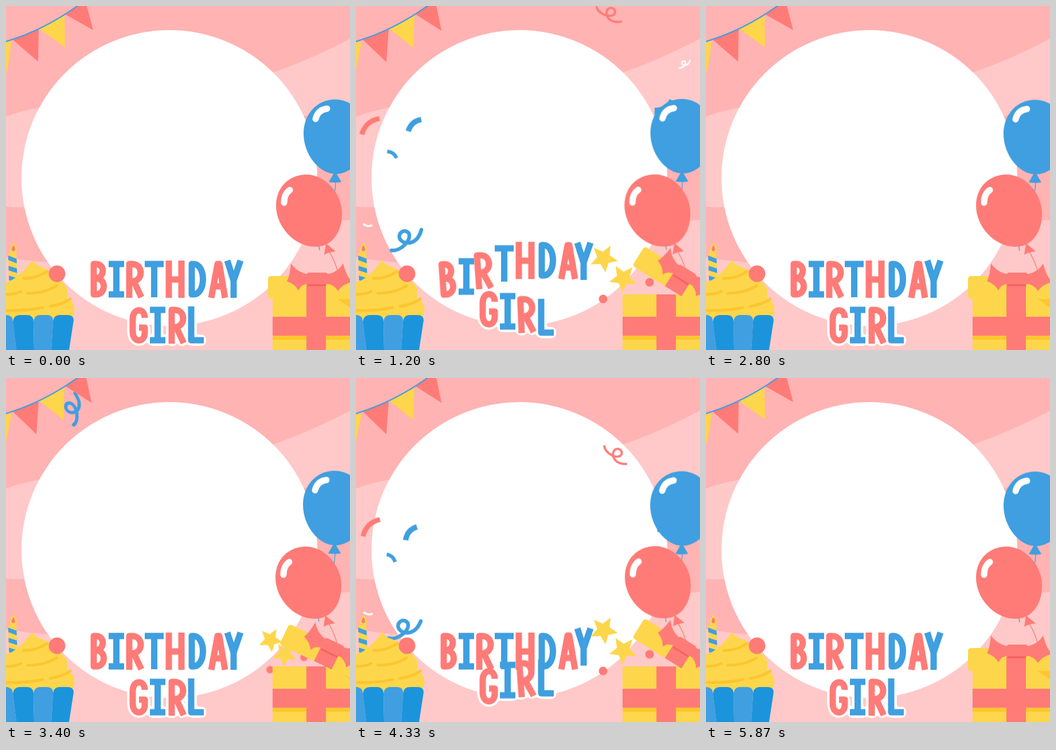
Animation, 600 px wide and 600 px high, one loop 5.94 s. Source, as an HTML page:

```html
<!DOCTYPE html>
<html lang="en">
<head>
<meta charset="utf-8">
<title>Birthday girl</title>
<style>
html, body { margin: 0; width: 100%; height: 100%; overflow: hidden; background: #fec9c8; }
svg { display: block; width: 100%; height: 100%; }
:root { --red: #ff7b77; --blue: #3f9fe0; --deep: #1c94dc; --yellow: #fdd64b; --amber: #fcc62f; --loop: 2970ms; }
.red { fill: var(--red); } .blue { fill: var(--blue); } .deep { fill: var(--deep); }
.yellow { fill: var(--yellow); } .amber { fill: var(--amber); } .white { fill: #fff; }
.line { fill: none; }

/* bunting */
.flag { transform-box: fill-box; transform-origin: 50% 0; animation: swing var(--loop) ease-in-out infinite; }
@keyframes swing { 0%, 2% { rotate: 0deg; } 14%, 68% { rotate: 3deg; } 84%, 100% { rotate: 0deg; } }

/* balloons */
.blue-x { animation: blue-x 1485ms ease-in-out infinite alternate; }
.blue-y { animation: blue-y 1485ms ease-in-out -742ms infinite alternate; }
.red-x { animation: red-x var(--loop) ease-in-out infinite; }
.red-y { animation: red-y var(--loop) ease-in-out infinite; }
@keyframes blue-x { to { transform: translateX(-6px); } }
@keyframes blue-y { from { transform: translateY(1.5px); } to { transform: translateY(-1.5px); } }
@keyframes red-x { 35% { transform: translateX(-3px); } 65%, 100% { transform: none; } }
@keyframes red-y { 0%, 30% { transform: none; } 66% { transform: translateY(-2px); } 100% { transform: none; } }

/* gift */
.lid { transform-origin: 457px 511px; animation: lid var(--loop) linear infinite; }
@keyframes lid {
  0%, 6% { transform: none; animation-timing-function: ease-out; }
  20%, 60.6% { transform: translate(25px, -58px) rotate(32deg); }
  82.5%, 100% { transform: none; }
}
.pop { animation: pop var(--loop) infinite; }
@keyframes pop {
  0%, 8% { transform: translate(540px, 502px) scale(.5); animation-timing-function: ease-out; }
  20%, 62.3% { transform: translate(var(--x), var(--y)); animation-timing-function: ease-in; }
  81%, 100% { transform: translate(540px, 502px) scale(.5); }
}

/* lettering */
.glyph { fill: none; stroke-width: 11; stroke-linejoin: round; }
.hop { transform-box: fill-box; transform-origin: 50% 100%; animation: hop var(--loop) infinite; }
@keyframes hop {
  0%, 27.6% { transform: none; animation-timing-function: cubic-bezier(.25, .2, .6, 1); }
  35.3%, 36.4% { transform: translateY(-33px) rotate(var(--tilt)); animation-timing-function: ease-in-out; }
  40.6% { transform: rotate(var(--tilt)); }
  44%, 100% { transform: none; }
}

/* confetti */
.bit { animation: fall var(--loop) linear infinite; }
@keyframes fall {
  0%, 10% { transform: var(--a); opacity: 0; }
  10.1% { transform: var(--a); opacity: 1; }
  30.3% { transform: var(--b); }
  40.4% { transform: var(--c); }
  74% { transform: var(--d); opacity: 1; }
  74.1%, 100% { transform: var(--d); opacity: 0; }
}
</style>
</head>
<body>
<svg viewBox="0 0 600 600" role="img" aria-label="Birthday girl">
  <!-- Even white rim around the letters: a blur, cut off hard -->
  <filter id="rim" filterUnits="userSpaceOnUse" x="120" y="380" width="320" height="220" color-interpolation-filters="sRGB">
    <feGaussianBlur in="SourceAlpha" stdDeviation="3"/>
    <feComponentTransfer result="fat"><feFuncA type="linear" slope="20" intercept="-1.4"/></feComponentTransfer>
    <feFlood flood-color="#fff"/>
    <feComposite in2="fat" operator="in" result="white"/>
    <feMerge><feMergeNode in="white"/><feMergeNode in="SourceGraphic"/></feMerge>
  </filter>

  <rect width="600" height="600" fill="#fec9c8"/>
  <path fill="#ffb3b3" d="M0 0H600V57Q530 94 465 116C330 170 170 150 45 180Q20 185 0 193Z"/>
  <path fill="#ffb3b3" d="M0 350C150 365 360 205 600 178V373C400 390 240 480 0 438Z"/>
  <circle class="white" cx="285" cy="300" r="258"/>

  <g id="confetti"></g>

  <path class="flag yellow" d="M-22 70L10 61L2 115Z"/>
  <path class="flag red" d="M12 59L57 40L56 97Z"/>
  <path class="flag yellow" d="M58 40L102 16L103 72Z"/>
  <path class="flag red" d="M104 15L138 -11L152 42Z"/>
  <path class="line" d="M-4 63Q66 43 130 -4" stroke="#3f9fe0" stroke-width="2.2"/>

  <g class="blue-x"><g class="blue-y">
    <path class="line" d="M575 303Q575 318 572 330Q535 380 547 426" stroke="#3f9fe0" stroke-width="1.3"/>
    <path class="blue" d="M574 288L585 307Q574 309 563 307Z"/>
    <path class="blue" d="M574 163C605 163 629 190 629 225C629 265 603 293 575 293C547 293 519 260 519 222C519 188 543 163 574 163Z"/>
    <path class="line" d="M540 197Q544 181 560 179" stroke="#fff" stroke-width="11" stroke-linecap="round"/>
  </g></g>
  <g class="red-x"><g class="red-y">
    <path class="line" d="M562 426Q572 440 579 464" stroke="#ff7b77" stroke-width="1.3"/>
    <path class="red" d="M558 414L575 428Q563 429 555 434Z"/>
    <path class="red" d="M524 294C556 294 586 326 586 362C586 400 564 420 540 420C502 420 471 384 471 348C471 315 495 294 524 294Z"/>
    <path class="line" d="M485 343Q485 328 495 321" stroke="#fff" stroke-width="11" stroke-linecap="round"/>
  </g></g>

  <g id="words" filter="url(#rim)"></g>

  <g id="pops"></g>
  <g>
    <rect class="yellow" x="465" y="503" width="140" height="100"/>
    <path class="amber" d="M567 503L600 526V503Z"/>
    <rect class="amber" x="465" y="575" width="140" height="7"/>
    <rect class="red" x="524" y="503" width="34" height="100"/>
    <rect class="red" x="465" y="542" width="140" height="33"/>
  </g>
  <g class="lid">
    <rect class="yellow" x="457" y="471" width="172" height="40" rx="5"/>
    <rect class="red" x="524" y="471" width="34" height="40"/>
    <path class="red" d="M528 468Q508 465 497 449Q495 471 490 480Q504 485 510 496Q515 485 528 484Z"/>
    <path class="red" d="M558 468Q579 465 588 449Q594 473 604 481Q586 486 579 497Q573 486 558 484Z"/>
    <rect class="red" x="524" y="465" width="38" height="21" rx="5"/>
    <path class="line" d="M526 487H558" stroke="#f0625f" stroke-width="3"/>
  </g>

  <g>
    <g transform="rotate(-2 12 456)">
      <rect class="yellow" x="4.500" y="431" width="14.500" height="54"/>
      <path class="blue" d="M4.500 435L19 441V449L4.500 443ZM4.500 453L19 458V466L4.500 461ZM4.500 470L19 475V483L4.500 478Z"/>
    </g>
    <path class="yellow" d="M13 412Q20 421 19 426Q17 432 12 432Q6 431 7 425Q8 419 13 412Z"/>
    <path class="red" d="M13 417Q17 423 15 427Q12 429 10 426Q9 422 13 417Z"/>
    <path class="yellow" d="M0 482C16 478 32 462 46 443Q48 451 62 455C75 460 80 467 77 476C99 476 112 491 106 510C120 515 123 531 115 545H0Z"/>
    <g class="line" stroke="#fcc62f" stroke-width="5" stroke-linecap="round">
      <path d="M31 475Q52 476 72 463"/>
      <path d="M-2 503Q18 503 26 498M38 501Q68 501 88 488"/>
      <path d="M-2 531Q38 532 64 526M77 524Q100 520 112 511"/>
    </g>
    <circle class="red" cx="89" cy="467" r="14.500"/>
    <path class="blue" d="M-10 539H2Q12 540 12 551L18 600H-10Z"/>
    <path class="deep" d="M12 551Q13 539 25 539H36Q48 539 48 551L49 600H18Z"/>
    <path class="blue" d="M48 551Q49 539 60 539H71Q83 539 82 551L79 600H49Z"/>
    <path class="deep" d="M82 551Q83 539 94 539H107Q118 539 118 548L110 600H79Z"/>
  </g>
</svg>
<script>
const NS = 'http://www.w3.org/2000/svg';
const RED = '#ff7b77', BLUE = '#3f9fe0', WHITE = '#fff';
const byId = id => document.getElementById(id);

function add(parent, tag, attrs = {}, vars = {}) {
  const el = document.createElementNS(NS, tag);
  for (const k in attrs) el.setAttribute(k, attrs[k]);
  for (const k in vars) el.style.setProperty(k, vars[k]);
  parent.append(el);
  return el;
}

const glyphs = {
  B: 'M6 6V59H10C28 59 28 31 10 31H8C26 31 26 6 10 6Z',
  I: 'M1 6H28M1 59H28M14.5 6V59',
  R: 'M6 65V6H11C31 6 31 36 11 36H8M14 36L27 64',
  T: 'M0 6H33M16.5 6V64',
  H: 'M6 0V65M28 0V65M6 33H28',
  D: 'M6 6V59H9C31 59 31 6 9 6Z',
  A: 'M4 65L15 6H18L28 65M8 45H25',
  Y: 'M4 0L15 35M27 0L15 35V65',
  G: 'M27 20C27 2 6 2 6 22V44C6 64 27 64 27 46V37H17',
  L: 'M6 0V59H28'
};
const words = [
  ['BIRTHDAY', 444, [147, 178, 209, 242, 278, 318, 354, 382]],
  ['GIRL', 524, [215, 250, 283, 317]]
];
const letters = words.flatMap(([word, y, xs]) => [...word].map((c, i) => ({ c, y, x: xs[i] })));

letters.forEach(({ c, x, y }, i) => {
  const place = add(byId('words'), 'g', { transform: `translate(${x} ${y})` });
  const hop = add(place, 'g', { class: 'hop' }, {
    '--tilt': 'BR'.includes(c) ? '-4deg' : '0deg',
    'animation-delay': i * 28 + 'ms'
  });
  add(hop, 'path', { class: 'glyph', d: glyphs[c], stroke: i % 2 ? BLUE : RED });
});

const star = (r, turn) => Array.from({ length: 10 }, (_, i) => {
  const a = i * Math.PI / 5 + turn, d = i % 2 ? r * 0.46 : r;
  return `${(d * Math.sin(a)).toFixed(1)},${(-d * Math.cos(a)).toFixed(1)}`;
}).join(' ');

const pop = (x, y) => add(byId('pops'), 'g', { class: 'pop' }, { '--x': x + 'px', '--y': y + 'px' });
for (const [x, y, turn] of [[432, 440, 0.5], [466, 475, 0.7]])
  add(pop(x, y), 'polygon', { points: star(25, turn), class: 'yellow' });
for (const [x, y] of [[512, 482], [431, 511]])
  add(pop(x, y), 'circle', { r: 7.5, class: 'red' });

const arc = 'M-16 4Q0 -6 16 4';
const curl = 'M-26 18C-10 20 10 0 4 -12C-4 -22 -18 -10 -10 0C0 10 20 6 26 -18';
// shape, colour, width, scale, then x, y, turn, flatness at three moments
const bits = [
  [arc, BLUE, 10, 0.95, [113, 90, 14], [100, 205, -42], [60, 600, -90]],
  [arc, BLUE, 10, 0.62, [53, 142, 18], [64, 257, 35], [55, 600, 80]],
  [arc, RED, 6.5, 1.3, [15, 98, -16], [22, 206, -42], [30, 527, -60]],
  [arc, BLUE, 11, 1.15, [495, 80, 165], [539, 178, 150], [565, 660, 120]],
  [arc, BLUE, 9, 0.75, [540, 86, -38], [562, 205, -60], [597, 490, -50, 2]],
  [curl, RED, 5, 0.78, [440, -90, 20], [441, 14, 65], [510, 760, 120]],
  [curl, WHITE, 7, 0.36, [575, -10, 0], [573, 101, 0], [560, 640, 60]],
  [arc, WHITE, 7, 0.5, [-25, 330, 170], [20, 383, 190], [25, 560, 200]],
  [curl, BLUE, 6.5, 1, [119, 367, 0, 0.1], [88, 408, 0], [70, 600, 40]]
];
const pose = (x, y, turn, flat = 1) => `translate(${x}px, ${y}px) rotate(${turn}deg) scaleX(${flat})`;

for (const [d, stroke, width, scale, b, c, e] of bits) {
  const bit = add(byId('confetti'), 'g', { class: 'bit' }, {
    '--a': pose(b[0], b[1] - 400, b[2] - 60),
    '--b': pose(...b), '--c': pose(...c), '--d': pose(...e)
  });
  add(bit, 'path', {
    d, stroke, 'stroke-width': width, class: 'line', transform: `scale(${scale})`,
    'stroke-linecap': d === curl ? 'round' : 'butt'
  });
}
</script>
</body>
</html>
```
